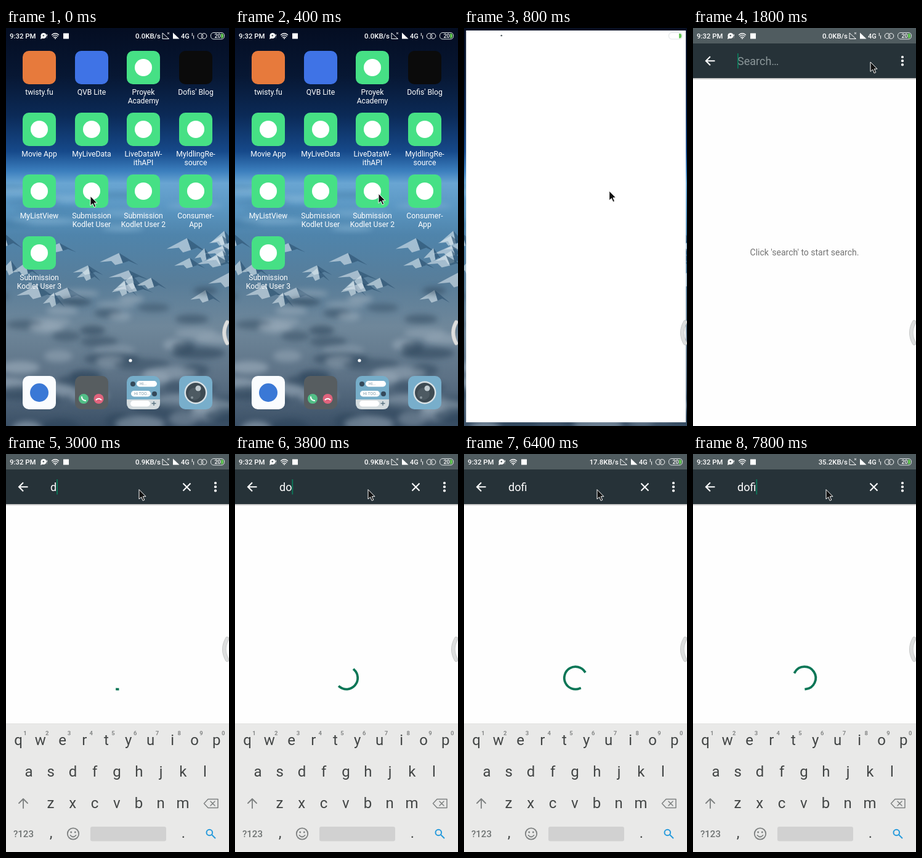
These frames come from a looping animation (362x644 px, 8000 ms). An HTML page:

```html
<!DOCTYPE html>
<html lang="en">
<head>
<meta charset="utf-8">
<title>User search on a phone</title>
<style>
html, body { margin: 0; width: 100%; height: 100%; overflow: hidden; background: #fff; }
svg { display: block; width: 100%; height: 100%; font-family: Roboto, "Noto Sans", sans-serif; }
.mid { text-anchor: middle; }
.label { fill: #fff; font-size: 12.2px; text-anchor: middle; }
.line { fill: none; stroke-linecap: round; stroke-linejoin: round; }
.key { fill: #424545; font-size: 24px; text-anchor: middle; }
.hint { fill: #868888; font-size: 9.5px; font-weight: 700; text-anchor: middle; }
.status { fill: #fff; font-size: 11.4px; font-weight: 500; }
</style>
</head>
<body>
<svg viewBox="0 0 362 644" preserveAspectRatio="none">
  <defs>
    <linearGradient id="sky" gradientUnits="userSpaceOnUse" x1="0" y1="0" x2="0" y2="644">
      <stop offset="0" stop-color="#040d22"/>
      <stop offset=".12" stop-color="#071733"/>
      <stop offset=".22" stop-color="#0b2a57"/>
      <stop offset=".31" stop-color="#16498a"/>
      <stop offset=".36" stop-color="#3c7fbe"/>
      <stop offset=".39" stop-color="#69a5d2"/>
      <stop offset=".45" stop-color="#5b97c3"/>
      <stop offset=".52" stop-color="#4f84ab"/>
      <stop offset=".64" stop-color="#587d99"/>
      <stop offset=".75" stop-color="#6f879a"/>
      <stop offset=".88" stop-color="#5c7185"/>
      <stop offset="1" stop-color="#3b5066"/>
    </linearGradient>
    <linearGradient id="shade" x1="0" y1="0" x2="0" y2="1">
      <stop offset="0" stop-color="#000" stop-opacity=".3"/>
      <stop offset="1" stop-color="#000" stop-opacity="0"/>
    </linearGradient>
    <filter id="soft" x="-50%" y="-80%" width="200%" height="260%"><feGaussianBlur stdDeviation="5"/></filter>
  </defs>

  <rect width="362" height="644" fill="url(#sky)"/>
  <g id="land"></g>
  <g id="home"></g>
  <rect id="window" fill="#fff"/>

  <g id="app">
    <rect width="362" height="644" fill="#fefefe"/>
    <rect width="362" height="25" fill="#505c60"/>
    <g id="toolbar">
      <rect y="81" width="362" height="3" fill="url(#shade)"/>
      <rect y="25" width="362" height="56" fill="#263238"/>
      <g fill="#fff"><circle cx="340" cy="47" r="2.1"/><circle cx="340" cy="53.2" r="2.1"/><circle cx="340" cy="59.4" r="2.1"/></g>
    </g>
    <text id="prompt" x="181" y="368" class="mid" font-size="14" fill="#737373">Click 'search' to start search.</text>
    <g id="field">
      <path d="M35.5 53.3H21.5M28 46.3L21 53.3L28 60.3" fill="none" stroke="#fff" stroke-width="2.1"/>
      <text id="query" x="72" y="60" font-size="18"></text>
      <rect id="caret" y="41" width="1.8" height="24.5" fill="#0b7a5a"/>
      <path id="clear" d="M287.5 47.5L299.5 59.5M299.5 47.5L287.5 59.5" stroke="#fff" stroke-width="2.1"/>
    </g>
    <path id="spinner" fill="none" stroke="#0b7656" stroke-width="3.8" stroke-linecap="square"/>
    <g id="keyboard"></g>
  </g>

  <g id="handle">
    <path class="line" d="M359 -17Q349.500 0 359 17" stroke="#c0c2c2" stroke-width="6.5"/>
    <path class="line" d="M359 -17Q349.500 0 359 17" stroke="#dddede" stroke-width="5"/>
  </g>

  <g class="status">
    <text x="6" y="17">9:32 PM</text>
    <circle cx="61" cy="12.5" r="4.6"/><path d="M57 13L56 18L61 16Z"/>
    <circle cx="60.8" cy="12.3" r="1.3" fill="#505c60"/><path d="M66.5 10v3.5M66.5 15.5v.6" stroke="#fff"/>
    <g class="line" stroke="#fff" stroke-width="1.3">
      <path d="M74.5 11Q80 6.5 85.5 11M76 13.3Q80 10 84 13.3M77.7 15.5Q80 13.8 82.3 15.5"/>
    </g>
    <circle cx="80" cy="17" r="1"/>
    <rect x="93" y="8.5" width="9" height="9"/>
    <text id="speed" x="251" y="17" text-anchor="end"></text>
    <path d="M254 8V17.5H264.5ZM262 7l3 3M265 7l-3 3" fill="none" stroke="#fff"/>
    <path d="M271 7.5V17.5H281.5Z"/>
    <text x="284" y="17" font-size="11">4G</text>
    <path d="M302.3 8v5M304.6 12v5.5" stroke="#fff" stroke-width="1"/>
    <g fill="none" stroke="#fff"><circle cx="315.5" cy="13" r="4.3"/><circle cx="321.5" cy="13" r="4.3"/></g>
    <rect x="332.5" y="7.5" width="22" height="10.5" rx="4.5" fill="none" stroke="#dfe5e6"/>
    <path d="M349 9h1.5q2.7 0 2.7 3.7t-2.7 3.8h-1.5z" fill="#62c354"/>
    <text x="343.5" y="16.3" class="mid" font-size="9">20</text>
  </g>

  <path id="pointer" d="M0 0V15.5L3.7 12.2L6.2 18L8.8 16.8L6.3 11.2H11Z" fill="#111" stroke="#fff" stroke-width="1"/>
</svg>

<script>
const LOOP = 8000, STEP = 200;
const $ = id => document.getElementById(id);
const clamp = v => Math.min(1, Math.max(0, v));
const smooth = v => { const c = clamp(v); return c * c * (3 - 2 * c); };
const mix = (a, b, p) => a + (b - a) * p;
const show = (id, on) => { $(id).style.display = on ? '' : 'none'; };

let seed = 11;
const random = () => (seed = seed * 16807 % 2147483647) / 2147483647;
const range = (a, b) => mix(a, b, random());

function cloud(y, tone, rx, ry) {
  return `<ellipse cx="${range(-10, 372)}" cy="${y}" rx="${range(rx, rx * 2.4)}" ry="${ry}"
    fill="${tone}" opacity="${range(.35, .6)}" filter="url(#soft)"/>`;
}

// Hazy streaks at the horizon, a snowy range, then clouds that grow towards the viewer.
function drawLand() {
  let out = '';
  for (let i = 0; i < 12; i++) out += cloud(258 + i * 6, i % 2 ? '#9cc6e2' : '#3c759f', 30, 4);
  for (let i = 0; i < 26; i++) {
    const x = range(-10, 370), y = 328 + i * 4, w = range(16, 34), h = range(12, 22);
    const at = (dx, dy) => `${x + dx * w} ${y + dy * h}`;
    out += `<path d="M${at(0, 0)}L${at(-1, .9)}L${at(-.4, .8)}L${at(-.2, 1.2)}L${at(.2, 1)}Z" fill="#dbe7ef" opacity=".6"/>
      <path d="M${at(0, 0)}L${at(.2, 1)}L${at(.5, .8)}L${at(1, 1.2)}Z" fill="#2b506f" opacity=".6"/>`;
  }
  for (let i = 0; i < 50; i++) {
    const near = i / 50;
    out += cloud(425 + i * 4.6, i % 2 ? '#a3b3c1' : '#2c4259', mix(14, 24, near), mix(6, 14, near));
  }
  $('land').innerHTML = out;
}

const GREEN = '#46e085';
const apps = [
  ['twisty.fu', '#e77a3c'], ['QVB Lite', '#3f73e6'], ['Proyek|Academy'], ["Dofis' Blog", '#0b0b0b'],
  ['Movie App'], ['MyLiveData'], ['LiveDataW-|ithAPI'], ['MyIdlingRe-|source'],
  ['MyListView'], ['Submission|Kodlet User'], ['Submission|Kodlet User 2'], ['Consumer-|App'],
  ['Submission|Kodlet User 3']
];
const columns = [54, 139, 223, 308];
const tile = (x, y, fill) => `<rect x="${x - 27}" y="${y - 27}" width="54" height="54" rx="10" fill="${fill}"/>`;
const disc = (x, y, r, fill) => `<circle cx="${x}" cy="${y}" r="${r}" fill="${fill}"/>`;
const bubble = (x, y, w, text) => `<rect x="${x}" y="${y}" width="${w}" height="9.5" rx="4.7" fill="#fff"/>
  <text x="${x + 5}" y="${y + 7.3}" font-size="6.5" fill="#7a98a8">${text}</text>`;

function drawHome() {
  let out = '';
  apps.forEach(([name, color], i) => {
    const x = columns[i % 4], y = 64 + 100 * Math.floor(i / 4);
    out += tile(x, y, color || GREEN);
    if (!color) out += disc(x, y, 14, '#fff');
    name.split('|').forEach((part, n) => {
      out += `<text class="label" x="${x}" y="${y + 44 + 14 * n}">${part}</text>`;
    });
  });
  const [a, b, c, d] = columns;
  out += disc(202, 538, 2.6, '#fff');
  out += tile(a, 590, '#fafcfe') + disc(a, 590, 15, '#3a78d6');
  out += tile(b, 590, '#575d60');
  [[126, '#52bf87'], [150.5, '#e0647d']].forEach(([x, color], i) => {
    out += disc(x, 600, 8, color) + `<path class="line" d="${i
      ? `M${x - 4} 601.5q4 -3.5 8 0` : `M${x - 3} 597q0 5 6 6`}" stroke="#fff" stroke-width="2"/>`;
  });
  out += tile(c, 590, '#76adc9') + disc(206, 576, 4, '#34495a') + disc(241, 592, 4, '#34495a')
    + bubble(212, 571, 33, 'Hi...') + bubble(203, 587, 32, 'Hi TOO...')
    + `<path d="M196 601H250V607Q250 617 240 617H206Q196 617 196 607Z" fill="#d5dcdf"/>`
    + bubble(202, 603, 32, '') + `<path d="M240 604v7M236.5 607.5h7" stroke="#56707f" stroke-width="1.3"/>`;
  out += tile(d, 590, '#78aecb') + disc(d, 590, 18.5, '#d9e2e6') + disc(d, 590, 16, '#3e4b53')
    + disc(d - 2, 592, 10, '#4d5a62') + disc(d + 4, 583, 4.5, '#c3ced3') + disc(d - 6, 598, 2, '#8a979e');
  $('home').innerHTML = out;
}

function drawKeyboard() {
  let out = '<rect y="437" width="362" height="207" fill="#e9e9e8"/><rect y="436" width="362" height="1" fill="#e0e0df"/>';
  [['qwertyuiop', 20, 471], ['asdfghjkl', 37, 521.5], ['zxcvbnm', 72.5, 572.5]].forEach(([keys, x0, y], row) => {
    [...keys].forEach((key, i) => {
      const x = x0 + i * 35.75;
      out += `<text class="key" x="${x}" y="${y}">${key}</text>`;
      if (!row) out += `<text class="hint" x="${x + 11}" y="454.5">${(i + 1) % 10}</text>`;
    });
  });
  out += `<g class="line" stroke="#7d8080" stroke-width="1.8">
      <path d="M28 573V558M21 565L28 558L35 565"/>
      <path d="M321.5 565.5L328 558.5H344V572.5H328ZM332 562l7 7M339 562l-7 7" stroke-width="1.5"/>
      <circle cx="109" cy="614.5" r="9.2"/><path d="M104.5 617Q109 622 113.5 617"/>
    </g>
    <circle cx="105.7" cy="612" r="1.4" fill="#7d8080"/><circle cx="112.3" cy="612" r="1.4" fill="#7d8080"/>
    <text class="mid" x="28.5" y="620" font-size="15" font-weight="500" fill="#6e7272">?123</text>
    <text class="key" x="73" y="621" font-size="20">,</text><text class="key" x="288" y="621">.</text>
    <rect x="137" y="603" width="123" height="23.5" rx="3" fill="#d1d1d1"/>
    <g fill="none" stroke="#279bdc" stroke-width="2"><circle cx="330.3" cy="612.5" r="4.8"/><path d="M334 616L340 622"/></g>`;
  $('keyboard').innerHTML = out;
}

// Last entry whose time has come.
const latest = (list, t) => list.filter(entry => entry[0] <= t).pop();

const pointerStops = [[0, 137, 272], [400, 233, 268], [600, 235, 268], [900, 236, 262],
  [1500, 288, 55], [1900, 288, 55], [2500, 216, 57.5], [LOOP, 216, 57.5]];
const typing = [[1600, ''], [2800, 'd'], [3700, 'do'], [4200, 'dof'], [5600, 'dofi']];
const speeds = [[0, '0.0'], [2800, '0.9'], [4600, '17.8'], [6800, '35.2']];
const spins = [[2947, 169], [4607, 3], [5700, 33], [7014, 135]];   // start time, base angle

function place(stops, t) {
  const i = stops.findIndex(stop => stop[0] > t);
  const [t0, x0, y0] = stops[i - 1], [t1, x1, y1] = stops[i];
  const p = smooth((t - t0) / (t1 - t0));
  return [mix(x0, x1, p), mix(y0, y1, p)];
}

function bezier(x, xs, ys) {
  const at = ([a, b, c, d], s) => {
    const r = 1 - s;
    return a * r ** 3 + 3 * b * r * r * s + 3 * c * r * s * s + d * s ** 3;
  };
  let low = 0, high = 1;
  for (let i = 0; i < 24; i++) {
    const s = (low + high) / 2;
    if (at(xs, s) < x) low = s; else high = s;
  }
  return at(ys, low);
}
const trimStart = u => u < .5 ? 0 : bezier(u, [.5, .7, .6, 1], [0, 0, 1, 1]);
const trimEnd = u => u < .5 ? bezier(u, [0, .2, .1, .5], [0, 0, 1, .96])
  : bezier(u, [.5, .967, .993, 1], [.96, .96, 1, 1]);

function spinnerPath(elapsed, base) {
  const turns = elapsed / 1333, u = turns % 1;
  const drift = base + 144 * Math.floor(turns) + 234 * u;
  const from = drift + 270 * trimStart(u), to = drift + 270 * trimEnd(u) + .5;
  const point = deg => {
    const a = deg * Math.PI / 180;
    return `${181 + 18.2 * Math.sin(a)} ${362.4 - 18.2 * Math.cos(a)}`;
  };
  return `M${point(from)}A18.2 18.2 0 ${to - from > 180 ? 1 : 0} 1 ${point(to)}`;
}

function render(t) {
  const open = smooth((t - 490) / 336);
  const zoom = 1 - .125 * open;
  $('home').setAttribute('transform', `translate(181 322) scale(${zoom}) translate(-181 -322)`);
  show('window', open > 0 && open < 1);
  const w = mix(54, 362, open), h = mix(54, 644, open);
  const box = { x: mix(223, 181, open) - w / 2, y: mix(264, 322, open) - h / 2, width: w, height: h };
  for (const name in box) $('window').setAttribute(name, box[name]);

  show('app', open === 1);
  show('toolbar', t >= 1000);
  show('prompt', t >= 1000 && t < 2800);

  const typed = latest(typing, t);
  show('field', typed);
  if (typed) {
    const [since, text] = typed, query = $('query');
    query.textContent = text || 'Search…';
    query.setAttribute('fill', text ? '#fff' : '#8b9699');
    $('caret').setAttribute('x', 72 + (text ? query.getComputedTextLength() : 0));
    show('caret', (t - since) % 1000 < 500);
    show('clear', text);
  }

  const spin = latest(spins, t);
  show('spinner', spin);
  if (spin) $('spinner').setAttribute('d', spinnerPath(t - spin[0], spin[1]));

  const rise = smooth((t - 1900) / 400);
  $('keyboard').setAttribute('transform', `translate(0 ${208 * (1 - rise)})`);
  $('handle').setAttribute('transform', `translate(0 ${mix(493, 316, rise)})`);
  $('speed').textContent = latest(speeds, t)[1] + 'KB/s';
  $('pointer').setAttribute('transform', `translate(${place(pointerStops, t)})`);
}

drawLand();
drawHome();
drawKeyboard();
const begin = performance.now();
function tick() {
  const t = (performance.now() - begin) % LOOP;
  render(Math.floor(t / STEP) * STEP);
  requestAnimationFrame(tick);
}
tick();
</script>
</body>
</html>
```
